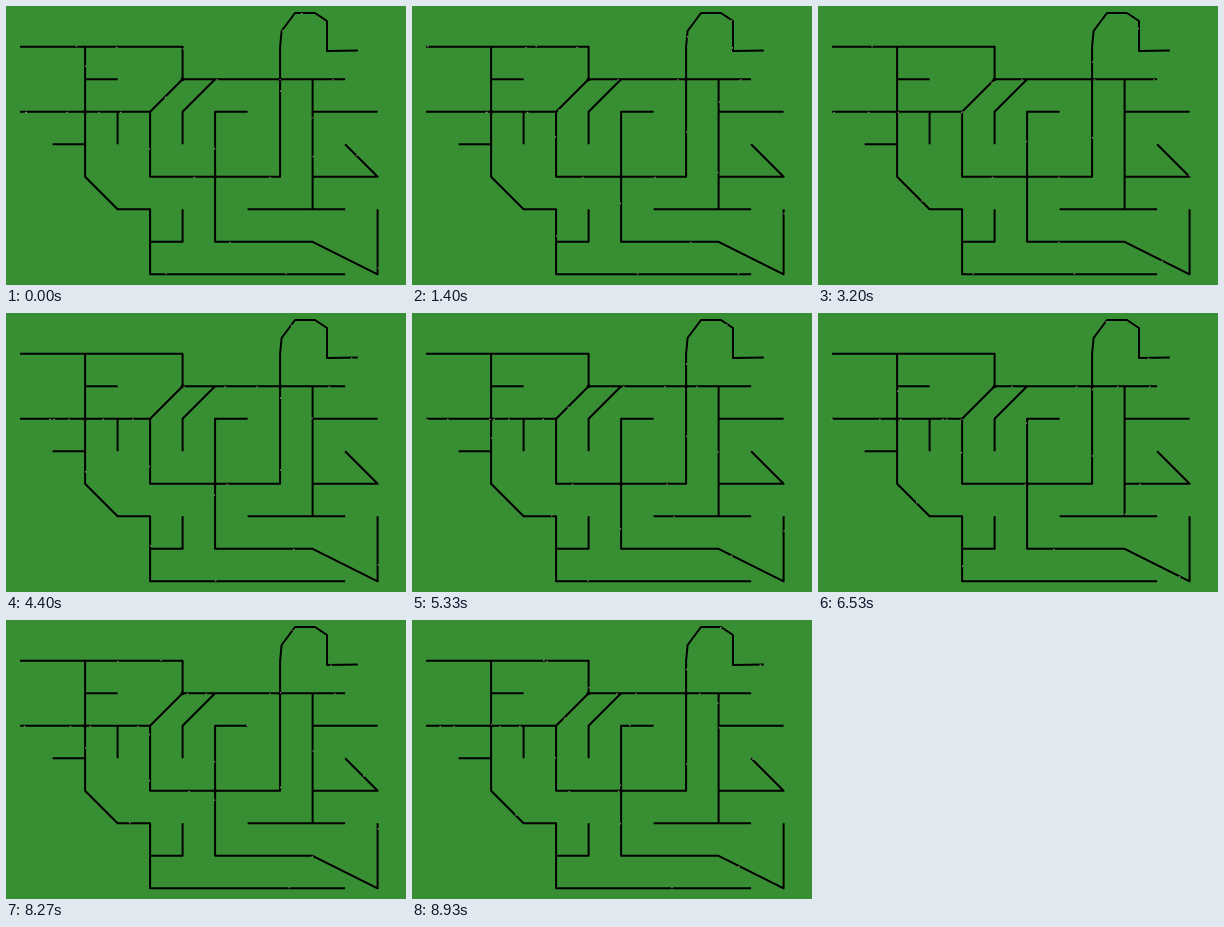
Animation of 400 by 279 pixels, one loop 9000 ms. Source, as an HTML page with a canvas:

```html
<!DOCTYPE html>
<html lang="en">
<head>
<meta charset="utf-8">
<title>Road traffic</title>
<style>
html, body { margin: 0; width: 100%; height: 100%; overflow: hidden; background: #388e33; }
canvas { display: block; width: 400px; height: 279px; }
</style>
</head>
<body>
<canvas id="map" width="400" height="279"></canvas>
<script>
const ctx = document.getElementById('map').getContext('2d');
const LOOP = 9000;
const TICK = 1000 / 15;
const SPEED = 0.039; // px per ms

// Points off the grid, for the bend at the top right
const BEND = { p: [275.6, 25], q: [289, 7], r: [309, 7], s: [321, 15], t: [321, 44.9], u: [351.8, 44.4] };

// Other points are a hex column and a row
const point = k => BEND[k] || [14.1 + 32.5 * parseInt(k[0], 16), 8.3 + 32.5 * k[1]];
const line = s => s.split(' ').map(point);

const roads = [
  '01 51 52', '21 25 36 46 48 a8', '22 32', '03 43 52 a2', '33 34', '14 24',
  '43 45 85 81 p q r s t u', '62 53 54', '73 63 67 97 b8 b6',
  '47 57 56', '92 96', '76 a6', '93 b3', '95 b5 a4'
].map(line);
const hubs = ['23', '52', '82', '65'].map(point);

let seed = 7;
const random = () => (seed = seed * 16807 % 2147483647) / 2147483647;

// A way with cars about `gap` px apart; negative starts set off later
function trip(way, gap) {
  const starts = [];
  for (let d = 500; d > -LOOP * SPEED; d -= gap * (0.3 + 1.4 * random())) starts.push(d);
  return { way: line(way), starts };
}

const trips = [
  trip('a8 48 46 36 25 21 51', 170),
  trip('03 43 52 a2', 50),
  trip('03 43 45 85 81 p q r s t u', 60),
  trip('73 63 67 97 b8 b6', 100),
  trip('52 51 01', 190),
  trip('76 96 92', 190),
  trip('92 95 b5 a4', 220)
];

// Place and heading at distance d, or null off the way
function along(way, d) {
  if (d < 0) return null;
  for (let i = 1; i < way.length; i++) {
    const [x, y] = way[i - 1];
    const dx = way[i][0] - x, dy = way[i][1] - y;
    const len = Math.hypot(dx, dy);
    if (d <= len) return { x: x + dx * d / len, y: y + dy * d / len, angle: Math.atan2(dy, dx) };
    d -= len;
  }
  return null;
}

function drawRoads() {
  ctx.fillStyle = '#388e33';
  ctx.fillRect(0, 0, 400, 279);
  ctx.strokeStyle = ctx.fillStyle = '#000';
  ctx.lineWidth = 2;
  ctx.lineJoin = 'round';
  for (const road of roads) {
    ctx.beginPath();
    road.forEach(([x, y]) => ctx.lineTo(x, y));
    ctx.stroke();
  }
  for (const [x, y] of hubs) {
    ctx.beginPath();
    ctx.arc(x, y, 1.9, 0, 7);
    ctx.fill();
  }
}

const paints = ['#e8eadf', '#d9dca8', '#e6cfc8', '#c9d8c4'];

function drawCars(t) {
  ctx.globalAlpha = 0.65;
  for (const { way, starts } of trips) {
    starts.forEach((start, i) => {
      const at = along(way, start + t * SPEED);
      if (!at) return;
      ctx.save();
      ctx.translate(at.x, at.y);
      ctx.rotate(at.angle);
      ctx.fillStyle = paints[i % paints.length];
      ctx.fillRect(-0.8, 0, 1.6, 1);
      ctx.restore();
    });
  }
  ctx.globalAlpha = 1;
}

const begin = performance.now();
function frame() {
  const t = (performance.now() - begin) % LOOP;
  drawRoads();
  drawCars(Math.floor(t / TICK) * TICK);
  requestAnimationFrame(frame);
}
frame();
</script>
</body>
</html>
```
